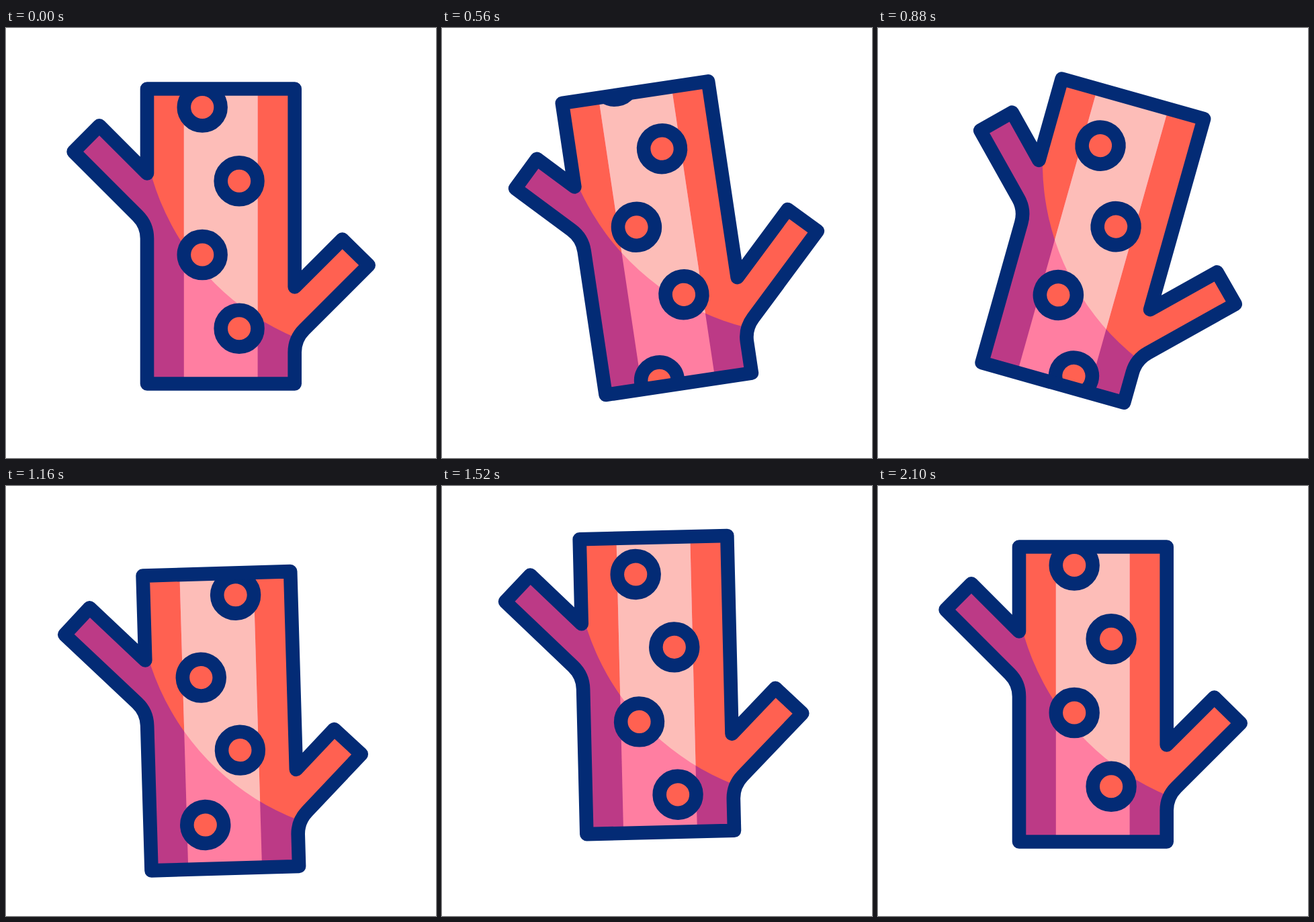
Write an HTML page that moves like this. It is 640 px wide and 640 px high and loops after 2220 ms.

```html
<!DOCTYPE html>
<html lang="en">
<head>
<meta charset="utf-8">
<title>Dancing log</title>
<style>
  html, body { margin: 0; width: 100%; height: 100%; overflow: hidden; background: #fff; }
  svg { display: block; width: 100%; height: 100%; }
  .line { stroke: #032b75; stroke-width: 20.6; stroke-linecap: round; stroke-linejoin: round; }
  .bark { fill: #ff6151; }
  .shade { fill: #bc3a86; }
  .stripe { fill: #ff7ea1; }
  .light { fill: #fdbdb8; }
</style>
</head>
<body>
<svg viewBox="0 0 640 640">
  <defs>
    <path id="shape"/>
    <rect id="band" x="264.8" y="90.5" width="109.8" height="439"/>
    <circle id="sun" cx="574.2" cy="117.5" r="372"/>
    <clipPath id="inShape"><use href="#shape"/></clipPath>
    <clipPath id="inSun"><use href="#sun"/></clipPath>
    <clipPath id="inTrunk"><rect x="210" y="90.5" width="220" height="439"/></clipPath>
  </defs>
  <g id="log">
    <g clip-path="url(#inShape)">
      <use href="#shape" class="shade"/>
      <use href="#sun" class="bark"/>
      <use href="#band" class="stripe"/>
      <use href="#band" class="light" clip-path="url(#inSun)"/>
    </g>
    <g clip-path="url(#inTrunk)"><g id="holes" class="bark line"></g></g>
    <use href="#shape" class="line" fill="none"/>
  </g>
</svg>
<script>
const LOOP = 2220, STEP = 20, CYCLE = 450.5, ROLL_TIME = 1960;
const SOFT = 0.364, SHARP = 0.62;
const $ = id => document.getElementById(id);
const shape = $('shape'), log = $('log'), holes = $('holes');

// cubic-bezier(k, 0, 1 - k, 1), solved by bisection
function ease(p, k) {
  let lo = 0, hi = 1;
  while (hi - lo > 1e-5) {
    const s = (lo + hi) / 2, r = 1 - s;
    const x = 3 * r * s * (r * k + s * (1 - k)) + s ** 3;
    if (x < p) lo = s; else hi = s;
  }
  return lo * lo * (3 - 2 * lo);
}

// Eases from each turning point [ms, value] to the next
function swing(t, ...turns) {
  const i = turns.findIndex(turn => turn[0] > t);
  if (i < 1) return 0;
  const [t0, v0] = turns[i - 1], [t1, v1] = turns[i];
  return v0 + (v1 - v0) * ease((t - t0) / (t1 - t0), SOFT);
}

const lift = t => swing(t, [0, 0], [377, 56], [708, -35.5], [1060, 52], [1430, -20], [1750, 13], [2100, 0]);
const tilt = t => swing(t, [0, 0], [405, -16.8], [865, 15.8], [1330, -9], [1690, 5], [2100, 0]);
const slide = (t, inward, outward) => swing(t, [60, 0], [685, inward], [1200, outward], [1735, 0]);
const roll = t => CYCLE * ease(Math.min(t / ROLL_TIME, 1), SHARP);

// The branches slide along their diagonals: l for the left, r for the right
function outline(l, r) {
  return `M210 90.5H429.7V385.5L${500.6 + r} ${314.6 - r}L${539.7 + r} ${353 - r}` +
    `L443.8 448.7A48 48 0 0 0 429.7 482.8V529.5H210V313.5A48 48 0 0 0 195.9 279.4` +
    `L${100.6 + l} ${184.1 + l}L${138.9 + l} ${145.4 + l}L210 216.5Z`;
}

// Two sets of four holes, one cycle apart
for (let i = 0; i < 8; i++) {
  const hole = document.createElementNS('http://www.w3.org/2000/svg', 'circle');
  hole.setAttribute('cx', i % 2 ? 347.1 : 292.2);
  hole.setAttribute('cy', 118 + 109.75 * (i % 4) + (i > 3 ? CYCLE : 0));
  hole.setAttribute('r', 27.4);
  holes.append(hole);
}

function draw(now) {
  const time = now % LOOP, t = time - time % STEP;
  shape.setAttribute('d', outline(slide(t, 24, -10), slide(t, 20, -13)));
  holes.setAttribute('transform', `translate(0 ${-roll(t)})`);
  log.setAttribute('transform', `translate(0 ${lift(t)}) rotate(${tilt(t)} 320 310)`);
}

const start = performance.now();
function tick() {
  draw(performance.now() - start);
  requestAnimationFrame(tick);
}
tick();
</script>
</body>
</html>
```
